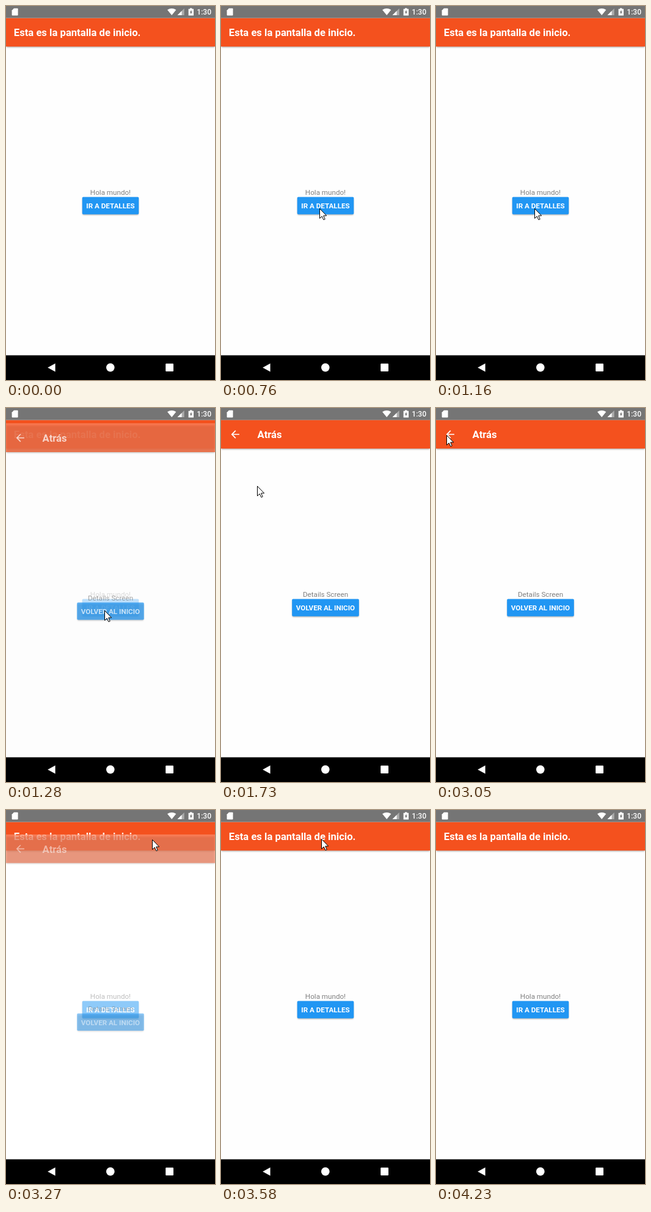
Animation, 342 px wide and 610 px high, one loop 5.03 s. Source, as an HTML page:

```html
<!DOCTYPE html>
<html lang="es">
<head>
<meta charset="utf-8">
<title>Pantallas</title>
<style>
  html, body { margin: 0; width: 100%; height: 100%; overflow: hidden; background: #fefefe; }
  svg { display: block; width: 342px; height: 610px; font-family: Roboto, Arial, sans-serif; }
  .bg { fill: #fefefe; }
  .bar { fill: #f4511e; }
  .button { fill: #2196f3; }
  .shade { fill: #000; filter: blur(1.3px); }
  .title { font-size: 16.64px; font-weight: 700; fill: #fff; }
  .body { font-size: 11.65px; fill: #808080; text-anchor: middle; }
  .label { font-size: 11.65px; font-weight: 700; fill: #fff; text-anchor: middle; }
  /* Each piece fades on its own, so the lower screen shows through twice */
  #details > * { opacity: var(--a); }
  .shade { fill-opacity: .3; }
</style>
</head>
<body>
<svg viewBox="0 0 342 610">
  <g id="home"></g>
  <g id="details"></g>

  <rect width="342" height="19.6" fill="#757575"/>
  <g fill="#fff">
    <path d="M13 3.8h5.6q1 0 1 1v9.6q0 1-1 1h-8q-1 0-1-1V7.2z"/>
    <path d="M264 6.3q7.2-4.8 14.4 0l-7.2 8.8z"/>
    <path d="M291.6 4v11h-11z" opacity=".4"/>
    <path d="M287.5 8.1v6.9h-7z"/>
    <path d="M301 3.4h3.4v1.3h2.6v10.8h-8.4V4.700h2.400z"/>
    <text x="336" y="14.200" font-size="12" font-weight="500" text-anchor="end">1:30</text>
  </g>
  <path d="M303.400 6.300l-2.600 4.400h1.500v3.100l2.600-4.500h-1.500z" fill="#757575"/>

  <rect y="569.700" width="342" height="40.300"/>
  <g fill="#fff">
    <path d="M68.200 589.700L80.600 583v13.400z"/>
    <circle cx="170.800" cy="589.600" r="6.800"/>
    <rect x="261.200" y="583.200" width="12.800" height="12.800" rx="1"/>
  </g>

  <path id="cursor" d="M.5.500V16.400L4.200 13l2.700 5.700 2.300-1L6.700 12h5z"
        fill="#fff" stroke="#000" stroke-linejoin="round"/>
</svg>
<script>
const LOOP = 5030;
const FADE = 350, OPEN = 1167, CLOSE = 3227;
const DROP = 41.6;
const ARROW = '<path transform="translate(13.300 33) scale(.832)" fill="#fff" ' +
  'd="M20 11H7.830l5.590-5.590L12 4l-8 8 8 8 1.410-1.410L7.830 13H20z"/>';

// Pointer route: [ms, x, y]
const ROUTE = [
  [370, 327, 412], [470, 269, 379], [600, 195, 345], [760, 161, 330],
  [1390, 161, 330], [1540, 120, 240], [1680, 68, 148], [1730, 59, 127],
  [1850, 45, 75], [1930, 72, 47], [2080, 222, 43], [2200, 186, 43],
  [2360, 80, 47], [2510, 8, 54], [2590, 7, 52], [2730, 15, 45],
  [3100, 18, 44], [3190, 95, 46], [3270, 238, 48], [3360, 275, 50],
  [3600, 155, 47], [3810, 80, 48], [3920, 122, 110], [4080, 238, 270],
  [4230, 317, 367]
];
// Opacity of the upper screen against its progress
const ALPHA = [[0, 0], [.52, .5], [.856, .7], [1, 1]];

const $ = id => document.getElementById(id);
const home = $('home'), details = $('details'), cursor = $('cursor');

function screen(title, x, text, label, width, extra = '') {
  const left = 171 - width / 2;
  return `<rect class="bg" y="19.600" width="342" height="551"/>
    <rect class="shade" x="1" y="23" width="340" height="44.500"/>
    <rect class="bar" y="19.600" width="342" height="46.600"/>${extra}
    <text class="title" x="${x}" y="49.300">${title}</text>
    <text class="body" x="171" y="308">${text}</text>
    <rect class="shade" x="${left + .5}" y="313.500" width="${width - 1}" height="27.500" rx="2"/>
    <rect class="button" x="${left}" y="311.400" width="${width}" height="28.300" rx="1.700"/>
    <text class="label" x="171" y="330.400">${label}</text>`;
}

home.innerHTML = screen('Esta es la pantalla de inicio.', 12.8, 'Hola mundo!', 'IR A DETALLES', 92.6);
details.innerHTML = screen('Atrás', 59.6, 'Details Screen', 'VOLVER AL INICIO', 109.6, ARROW);

const clamp = v => Math.min(1, Math.max(0, v));
const easeOut = v => 1 - (1 - clamp(v)) ** 5;

function alpha(p) {
  const i = Math.max(1, ALPHA.findIndex(([at]) => p <= at));
  const [p0, a0] = ALPHA[i - 1], [p1, a1] = ALPHA[i];
  return a0 + (a1 - a0) * (p - p0) / (p1 - p0);
}

const slope = (i, k) => (ROUTE[i + 1][k] - ROUTE[i][k]) / (ROUTE[i + 1][0] - ROUTE[i][0]);

// Harmonic mean keeps the curve from overshooting its turning points
function tangent(i, k) {
  if (i === 0) return slope(0, k);
  if (i === ROUTE.length - 1) return slope(i - 1, k);
  const a = slope(i - 1, k), b = slope(i, k);
  return a * b > 0 ? 2 * a * b / (a + b) : 0;
}

function along(t, k) {
  const i = ROUTE.findIndex(p => p[0] > t) - 1;
  const p = ROUTE[i], q = ROUTE[i + 1], d = q[0] - p[0], u = (t - p[0]) / d;
  const s = u * u * (3 - 2 * u);
  return p[k] + (q[k] - p[k]) * s
    + d * u * (1 - u) * ((1 - u) * tangent(i, k) - u * tangent(i + 1, k));
}

function draw(t) {
  const p = easeOut((t - OPEN) / FADE) - easeOut((t - CLOSE) / FADE);
  details.style.display = p > 0 ? '' : 'none';
  details.style.setProperty('--a', alpha(p));
  details.setAttribute('transform', `translate(0 ${DROP * (1 - p)})`);

  const shown = t >= ROUTE[0][0] && t < ROUTE[ROUTE.length - 1][0];
  cursor.style.display = shown ? '' : 'none';
  if (shown) {
    cursor.setAttribute('transform', `translate(${Math.round(along(t, 1))} ${Math.round(along(t, 2))})`);
  }
}

const start = performance.now();
function tick() {
  draw((performance.now() - start) % LOOP);
  requestAnimationFrame(tick);
}
tick();
</script>
</body>
</html>
```
